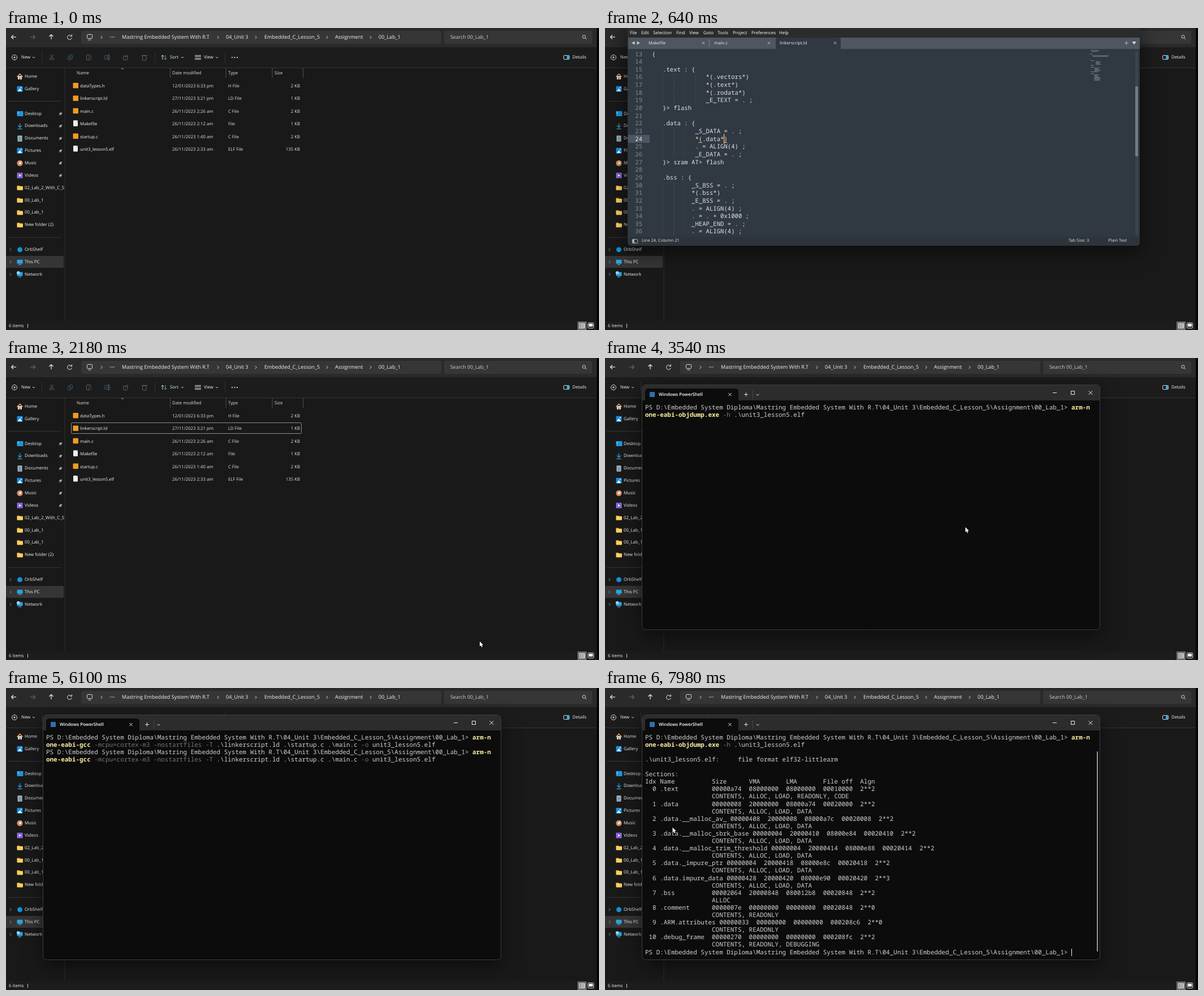
These frames come from a looping animation (1049 by 534 pixels, 8 s). An HTML page with a canvas:

```html
<!DOCTYPE html>
<html lang="en">
<head>
<meta charset="utf-8">
<title>Linker script demo</title>
<style>
  html, body { margin: 0; width: 100%; height: 100%; overflow: hidden; background: #191919; }
  canvas { display: block; }
</style>
</head>
<body>
<canvas id="stage" width="1049" height="534"></canvas>
<script>
const c = document.getElementById('stage').getContext('2d');
const LOOP = 8000;
const UI = '"Open Sans", "Noto Sans", sans-serif';
const MONO = '"Noto Sans Mono", "DejaVu Sans Mono", monospace';
const COURSE = 'Mastring Embedded System With R.T';

// Drawing helpers
function box(x, y, w, h, fill, r = 0, stroke) {
  c.beginPath();
  c.roundRect(x, y, w, h, r);
  if (fill) { c.fillStyle = fill; c.fill(); }
  if (stroke) { c.strokeStyle = stroke; c.lineWidth = 1; c.stroke(); }
}
function line(color, pts, width = 1) {
  c.beginPath();
  for (let i = 0; i < pts.length; i += 2) c.lineTo(pts[i], pts[i + 1]);
  c.strokeStyle = color;
  c.lineWidth = width;
  c.stroke();
}
function ring(x, y, r, color, from = 0, to = 7) {
  c.beginPath();
  c.arc(x, y, r, from, Math.min(to, from + Math.PI * 2));
  c.strokeStyle = color;
  c.lineWidth = 1;
  c.stroke();
}
function dot(x, y, r, color) {
  c.beginPath();
  c.arc(x, y, r, 0, 7);
  c.fillStyle = color;
  c.fill();
}
function text(s, x, y, size = 7.8, color = '#f2f2f2', align = 'left', weight = 400) {
  c.font = `${weight} ${size}px ${UI}`;
  c.fillStyle = color;
  c.textAlign = align;
  c.fillText(s, x, y);
}
function chevron(x, y, dir, color = '#ccc', s = 2) {
  if (dir === 'right') line(color, [x - s / 2, y - s, x + s / 2, y, x - s / 2, y + s]);
  else {
    const k = dir === 'down' ? 1 : -1;
    line(color, [x - s, y - k * s / 2, x, y + k * s / 2, x + s, y - k * s / 2]);
  }
}
function cross(x, y, s, color) {
  line(color, [x - s, y - s, x + s, y + s]);
  line(color, [x + s, y - s, x - s, y + s]);
}
function arrow(x, y, dx, dy, color) {
  const px = -dy, py = dx;
  line(color, [x - dx * 4, y - dy * 4, x + dx * 4, y + dy * 4], 1.2);
  line(color, [x + (px) * 3.5 + dx, y + py * 3.5 + dy, x + dx * 4.5, y + dy * 4.5,
               x - px * 3.5 + dx, y - py * 3.5 + dy], 1.2);
}
function shadowBox(x, y, w, h, fill, r) {
  c.save();
  c.shadowColor = 'rgba(0,0,0,.55)';
  c.shadowBlur = 34;
  c.shadowOffsetY = 10;
  box(x, y, w, h, fill, r);
  c.restore();
}
function mono(s, x, y, cell, colorAt, boldAt = () => false) {
  const size = cell / 0.6;
  c.textAlign = 'left';
  for (let i = 0; i < s.length; i++) {
    if (s[i] === ' ') continue;
    c.font = `${boldAt(i) ? 700 : 500} ${size}px ${MONO}`;
    c.fillStyle = colorAt(i);
    c.fillText(s[i], x + i * cell, y);
  }
}
const clamp = v => Math.max(0, Math.min(1, v));
const ease = v => v * v * (3 - 2 * v);

// File manager
const FILES = [
  ['dataTypes.h', '12/01/2023 6:33 pm', 'H File', '2 KB'],
  ['linkerscript.ld', '27/11/2023 3:21 pm', 'LD File', '1 KB'],
  ['main.c', '26/11/2023 2:26 am', 'C File', '2 KB'],
  ['Makefile', '26/11/2023 2:12 am', 'File', '1 KB'],
  ['startup.c', '26/11/2023 1:40 am', 'C File', '2 KB'],
  ['unit3_lesson5.elf', '26/11/2023 2:33 am', 'ELF File', '135 KB']
];
const SIDE = ['Home', 'Gallery', '', 'Desktop', 'Downloads', 'Documents', 'Pictures', 'Music',
  'Videos', '02_Lab_2_With_C_S', '00_Lab_1', '00_Lab_1', 'New folder (2)', '',
  'OrbShelf', 'This PC', 'Network'];
const CRUMBS = [[COURSE, 205, 375], ['04_Unit 3', 389, 442], ['Embedded_C_Lesson_5', 457, 568],
  ['Assignment', 582, 645], ['00_Lab_1', 659]];

function sideIcon(name, x, y) {
  const picture = () => {
    box(x - 5, y - 5, 10, 10, '#1a8ee0', 1);
    c.fillStyle = '#e9f5ff';
    c.beginPath(); c.moveTo(x - 4, y + 4); c.lineTo(x, y - 1); c.lineTo(x + 4, y + 4); c.fill();
    dot(x + 2.3, y - 2.3, 1, '#fff');
  };
  const screen = () => {
    box(x - 5, y - 4, 10, 7, '#26a5e4', 1);
    box(x - 2.5, y + 4, 5, 1, '#9ad');
  };
  const draw = {
    Home() {
      box(x - 3.5, y - 1, 7, 6, '#d9d9d9');
      box(x - 1, y + 1.5, 2, 3.5, '#8a6a50');
      line('#eda05a', [x - 5, y + 0.5, x, y - 4.5, x + 5, y + 0.5], 1.6);
    },
    Gallery: picture,
    Pictures: picture,
    Desktop() { box(x - 5, y - 4.5, 11, 9, '#1c95dc', 1); box(x - 4, y - 3, 2, 1, '#bfe6ff'); box(x - 4, y - 1, 2, 1, '#bfe6ff'); },
    Downloads() {
      line('#2aa3df', [x, y - 5, x, y + 2], 1.3);
      line('#2aa3df', [x - 3.5, y - 1, x, y + 2.5, x + 3.5, y - 1], 1.3);
      line('#2aa3df', [x - 4, y + 5, x + 4, y + 5], 1.3);
    },
    Documents() {
      box(x - 4, y - 5, 8, 10.5, '#a9bccb', 1);
      for (const d of [-2.5, 0, 2.5]) box(x - 2.5, y + d, 5, 1, '#4d6478');
    },
    Music() { dot(x, y, 5.2, '#d08a62'); dot(x, y, 2, '#f5e6dc'); line('#fff', [x + 1.5, y + 1, x + 1.5, y - 3, x + 3, y - 2]); },
    Videos() {
      box(x - 5, y - 5, 10, 10, '#7d5bd8', 1);
      c.fillStyle = '#fff';
      c.beginPath(); c.moveTo(x - 1.5, y - 2.3); c.lineTo(x + 2.5, y); c.lineTo(x - 1.5, y + 2.3); c.fill();
      for (const d of [-3.5, -0.5, 2.5]) { box(x - 4.3, y + d, 1, 1, '#ddd'); box(x + 3.5, y + d, 1, 1, '#ddd'); }
    },
    OrbShelf() { dot(x, y, 4.5, '#1490df'); },
    'This PC': screen,
    Network() { screen(); dot(x - 2.8, y - 2.8, 2.8, '#9fd2ef'); }
  }[name];
  if (draw) return draw();
  box(x - 5, y - 4, 5, 3, '#e8a92d', 1);
  box(x - 5, y - 2.8, 10.5, 7, '#fdd05f', 1);
}

function pin(x, y) {
  line('#999', [x - 3, y + 3, x - 0.5, y + 0.5]);
  line('#b0b0b0', [x - 2, y - 1, x + 1, y + 2], 2);
  line('#b0b0b0', [x - 0.5, y + 0.5, x + 2, y - 2], 2.4);
}

function toolIcons() {
  const dim = '#5b6268', blue = '#2f5a73';
  ring(15, 52, 4.5, '#e0e0e0');
  line('#e0e0e0', [13, 52, 17, 52]); line('#e0e0e0', [15, 50, 15, 54]);
  line(dim, [78, 47, 83, 54]); line(dim, [84, 47, 79, 54]);
  ring(78.5, 55, 1.7, blue); ring(83.5, 55, 1.7, blue);
  box(109.5, 49.5, 5, 7, null, 1, blue); box(112.5, 47.5, 5, 7, null, 1, blue);
  box(142.5, 47.5, 7, 9, null, 1, dim); box(146.5, 50.5, 4, 6, '#1c1c1c', 1, blue);
  box(174.5, 48.5, 9, 7, null, 1, blue);
  text('A', 177, 52, 6, dim); line(dim, [181.5, 46, 181.5, 58]);
  box(207.5, 49.5, 7, 7, null, 1, dim); line(blue, [210, 53, 212, 50, 216, 49.5]); line(blue, [214, 47, 216.5, 49.5, 214, 52]);
  line(dim, [240, 48.5, 250, 48.5]); box(241.5, 49, 6.5, 8, null, 1, dim);
  line('#d5d5d5', [277, 56, 277, 48]); line('#d5d5d5', [274.5, 50.5, 277, 48, 279.5, 50.5]);
  line('#4aa8dd', [282, 48, 282, 56]); line('#4aa8dd', [279.5, 53.5, 282, 56, 284.5, 53.5]);
  for (const y of [48.5, 50.5, 53.5, 55.5]) line('#cfcfcf', [334, y, 345, y]);
  for (const x of [400, 404.5, 409]) dot(x, 52, 1.1, '#eee');
  box(986.5, 48.5, 10, 7, null, 1.5, '#d5d5d5'); box(992, 48.5, 4.5, 7, '#3aa0dd', 1);
}

function explorer(mouse, focused) {
  box(0, 0, 1049, 534, '#191919');
  box(0, 0, 1045, 34, '#2a2a2a');
  box(0, 34, 1045, 36, '#1c1c1c');
  line('#343434', [0, 70.5, 1045, 70.5]);

  arrow(14, 16, -1, 0, '#eee');
  arrow(47, 16, 1, 0, '#666');
  arrow(80, 16, 0, -1, '#eee');
  ring(112.5, 16.5, 3.8, '#eee', 0.2, 5.6);
  line('#eee', [113.5, 14.5, 116.5, 14.5, 116.5, 11.5]);
  box(133, 5, 637, 23, '#363636', 3);
  box(775, 5, 262, 23, '#363636', 3);
  box(143.5, 11.5, 9, 7, null, 1, '#ddd');
  line('#ddd', [145.5, 21, 150.5, 21]);
  chevron(169, 16.5, 'right', '#ddd', 2.5);
  for (const x of [185, 188, 191]) dot(x, 16, 0.8, '#eee');
  for (const [s, x, next] of CRUMBS) {
    text(s, x, 16.5, 9.05);
    if (next) chevron(next, 16.5, 'right', '#ddd', 2.5);
  }
  text('Search 00_Lab_1', 786, 16.5, 8.8, '#cfcfcf');
  ring(1022.5, 15.5, 2.7, '#ddd');
  line('#ddd', [1024.5, 17.5, 1027, 20]);

  toolIcons();
  for (const x of [63.5, 263.5, 387.5]) line('#303030', [x, 42, x, 62]);
  text('New', 27, 52); chevron(49, 52, 'down');
  text('Sort', 290, 52); chevron(312, 52, 'down');
  text('View', 350, 52); chevron(373, 52, 'down');
  text('Details', 1002, 52);

  line('#2f2f2f', [104, 71, 104, 518]);
  box(0, 403, 102, 21, '#353535', 1);
  for (const y of [129.5, 370.5]) line('#353535', [3, y, 97, y]);
  c.save();
  c.beginPath(); c.rect(0, 70, 103, 460); c.clip();
  SIDE.forEach((name, i) => {
    const y = 86 + i * 21.85;
    if (!name) return;
    sideIcon(name, 24.5, y);
    text(name, 33, y);
    if (i > 2 && i < 9) pin(96.5, y);
    if (i > 13) chevron(8, y, 'right', '#8a8a8a', 2.5);
  });
  c.restore();

  [['Name', 125], ['Date modified', 294], ['Type', 393], ['Size', 475]]
    .forEach(([s, x]) => text(s, x, 79.5, 7.8, '#dedede'));
  for (const x of [290.5, 389, 471, 525.5]) line('#505050', [x, 71, x, 88]);
  chevron(206, 72, 'up', '#aaa');
  FILES.forEach(([name, date, type, size], i) => {
    const y = 102.5 + i * 22.4, top = Math.round(y - 11);
    const hot = mouse && mouse[0] > 115 && mouse[0] < 523 && Math.abs(mouse[1] - y) < 10.5;
    if (hot) box(115, top, 408, 20, '#303030', 2);
    if (i === 1 && focused) box(115.5, top + 0.5, 407, 19, null, 1, '#8c8c8c');
    if (/\.(h|ld|c)$/.test(name)) box(118.5, y - 5.5, 9.5, 9.5, '#f29a22', 1);
    else {
      box(119, y - 6.5, 8, 10.5, '#f0f0f0', 1);
      box(124.5, y - 6.5, 2.5, 2.5, '#bdbdbd');
    }
    text(name, 131, y + 0.5, 7.7);
    text(date, 294, y + 0.5, 7.8, '#e0e0e0');
    text(type, 393, y + 0.5, 7.7, '#e0e0e0');
    text(size, 520, y + 0.5, 7.8, '#e0e0e0', 'right');
  });

  box(0, 518, 1045, 16, '#1c1c1c');
  text('6 items', 5, 526.5);
  line('#ccc', [38.5, 523, 38.5, 530]);
  box(1011, 519, 16, 15, '#6e6e6e');
  box(1014.5, 522.5, 9, 8, null, 0, '#eee');
  for (const y of [524.5, 526.5, 528.5]) line('#eee', [1016, y, 1023, y]);
  box(1029.5, 521.5, 10, 9, '#111', 1, '#eee');
  box(1031, 523, 7, 5, '#fff');
  box(1045, 0, 4, 534, '#050505');
}

// Code editor: [column, text] from line 13 on
const CODE = [[0, '{'], [0, ''], [3, '.text : {'], [15, '*(.vectors*)'], [15, '*(.text*)'],
  [15, '*(.rodata*)'], [15, '_E_TEXT = . ;'], [3, '}> flash'], [0, ''], [3, '.data : {'],
  [12, '_S_DATA = . ;'], [12, '*(.data*)'], [12, '. = ALIGN(4) ;'], [12, '_E_DATA = . ;'],
  [3, '}> sram AT> flash'], [0, ''], [3, '.bss : {'], [11, '_S_BSS = . ;'], [11, '*(.bss*)'],
  [11, '_E_BSS = . ;'], [11, '. = ALIGN(4) ;'], [11, '. = . + 0x1000 ;'],
  [11, '_HEAP_END = . ;'], [11, '. = ALIGN(4) ;']];
const MENU = [['File', 44], ['Edit', 64], ['Selection', 85], ['Find', 126], ['View', 149], ['Goto', 174],
  ['Tools', 199], ['Project', 226], ['Preferences', 259], ['Help', 308]];

function editor(t) {
  const cell = 6.37, left = 83, edited = t >= 1240;
  shadowBox(40, -14, 906, 399, '#303841', 6);
  box(41, 0, 905, 17, '#2b2b2b');
  MENU.forEach(([s, x]) => text(s, x, 8.5, 7.8, '#fff'));
  box(41, 17, 905, 20, '#4e565f');
  box(302, 17, 115, 20, '#303841', [3, 3, 0, 0]);
  line('#78808a', [184.5, 20, 184.5, 34]);
  c.fillStyle = '#c5cad0';
  for (const k of [-1, 1]) {
    c.beginPath();
    c.moveTo(54.5 + k * 7.5, 26.5); c.lineTo(54.5 + k * 2, 23.5); c.lineTo(54.5 + k * 2, 29.5);
    c.fill();
  }
  [['Makefile', 77, 174], ['main.c', 193, 290], ['linkerscript.ld', 309, 407]].forEach(([s, x, end], i) => {
    text(s, x, 26.5, 7.7, '#e8ebee');
    if (i === 2 && t >= 1260) dot(end, 26.5, 2.5, '#c5cad0');
    else cross(end, 26.5, 2.2, '#b9bfc6');
  });
  line('#aab0b7', [919, 26.5, 926, 26.5]); line('#aab0b7', [922.5, 23, 922.5, 30]);
  c.fillStyle = '#d5d9dd';
  c.beginPath(); c.moveTo(932.5, 24); c.lineTo(939.5, 24); c.lineTo(936, 29.5); c.fill();

  c.save();
  c.beginPath(); c.rect(40, 37, 906, 332); c.clip();
  box(41, 189, 38, 14, '#4b5763');
  if (edited) box(40, 189, 2, 14, '#f9ae58');
  CODE.forEach(([col, s], i) => {
    const y = 46.5 + i * 13.65, num = String(13 + i), here = i === 11;
    if (here && edited) s = s.replace('*)', ')');
    const shade = here ? '#e6e9ed' : '#848b95';
    mono(num, 66 - 2 * cell, y, cell, () => shade);
    for (let g = 3; g < col; g += 3) line('#3b444e', [left + g * cell + 0.5, y - 7, left + g * cell + 0.5, y + 7]);
    mono(s, left + col * cell, y, cell, () => '#dfe4ec');
    if (s) box(857 + col * 0.75, 54 + i * 1.65, s.length * 0.7, 0.9, '#7d858f');
  });
  [[859, 39, 15], [860, 41, 12], [857, 45.5, 5], [861, 48.5, 30], [863, 49.7, 26]]
    .forEach(([x, y, w]) => box(x, y, w, 0.9, '#7d858f'));
  const end = left + (edited ? 19 : 20) * cell;
  box(165.5, 202, 6.5, 1, '#f9ae58');
  box(end, 202, 6, 1, '#f9ae58');
  box(end - 0.5, 187.5, 1.5, 17, '#f9ae58');
  box(938, 41, 5, 325, '#3b434c', 2);
  box(938, 103, 5, 124, '#747b83', 2);
  c.restore();

  box(41, 369, 905, 16, '#2d343c', [0, 0, 6, 6]);
  box(48.5, 373.5, 9, 7, null, 1, '#a8aeb5');
  box(49, 374, 3, 6, '#a8aeb5');
  text(`Line 24, Column ${edited ? 20 : 21}`, 65, 376.5, 7.5, '#dde1e5');
  text('Tab Size: 3', 820, 376.5, 7.5, '#dde1e5');
  text('Plain Text', 890, 376.5, 7.5, '#dde1e5');
}

// Terminal
const COLS = 120, ROWS = 30, CELL = 6.557, STEP = 13.1;
const PROMPT = `PS D:\\Embedded System Diploma\\${COURSE}\\04_Unit 3\\Embedded_C_Lesson_5\\Assignment\\00_Lab_1> `;
const GCC = 'arm-none-eabi-gcc -mcpu=cortex-m3 -nostartfiles -T .\\linkerscript.ld .\\startup.c .\\main.c -o unit3_lesson5.elf';
const DUMP = 'arm-none-eabi-objdump.exe -h .\\unit3_lesson5.elf';
const DATA = 'CONTENTS, ALLOC, LOAD, DATA';
const SECTIONS = [
  ['.text', '00000a74  08000000  08000000  00010000  2**2', 'CONTENTS, ALLOC, LOAD, READONLY, CODE'],
  ['.data', '00000008  20000000  08000a74  00020000  2**2', DATA],
  ['.data.__malloc_av_', '00000408  20000008  08000a7c  00020008  2**2', DATA],
  ['.data.__malloc_sbrk_base', '00000004  20000410  08000e84  00020410  2**2', DATA],
  ['.data.__malloc_trim_threshold', '00000004  20000414  08000e88  00020414  2**2', DATA],
  ['.data._impure_ptr', '00000004  20000418  08000e8c  00020418  2**2', DATA],
  ['.data.impure_data', '00000428  20000420  08000e90  00020420  2**3', DATA],
  ['.bss', '00002064  20000848  080012b8  00020848  2**2', 'ALLOC'],
  ['.comment', '0000007e  00000000  00000000  00020848  2**0', 'CONTENTS, READONLY'],
  ['.ARM.attributes', '00000033  00000000  00000000  000208c6  2**0', 'CONTENTS, READONLY'],
  ['.debug_frame', '00000270  00000000  00000000  000208fc  2**2', 'CONTENTS, READONLY, DEBUGGING']
];
const OUTPUT = ['', '.\\unit3_lesson5.elf:     file format elf32-littlearm', '', 'Sections:',
  'Idx Name          Size      VMA       LMA       File off  Algn',
  ...SECTIONS.flatMap(([name, nums, flags], i) =>
    [`${String(i).padStart(3)} ${name.padEnd(13)} ${nums}`, ' '.repeat(18) + flags])].join('\n');
const HALFWAY = OUTPUT.indexOf('00000428  2') + 11;

// Rows of a prompt with a command; key marks each character's colour
function entry(cmd = '') {
  const s = PROMPT + cmd;
  const key = ' '.repeat(PROMPT.length) +
    cmd.replace(/\S+/g, (w, i) => (i === 0 ? 'y' : w[0] === '-' ? 'g' : ' ').repeat(w.length));
  const rows = [];
  for (let i = 0; i < s.length; i += COLS) rows.push({ s: s.slice(i, i + COLS), key: key.slice(i, i + COLS) });
  return rows;
}
const plain = s => s.split('\n').map(row => ({ s: row, key: '' }));

function session(t) {
  if (t < 2940) return entry();
  if (t < 3060) return entry('ar');
  if (t < 3220) return entry('arm');
  if (t < 3820) return entry(DUMP);
  if (t < 4280) return entry(GCC);
  const done = entry(GCC);
  if (t < 5080) return [...done, ...plain('')];
  if (t < 5760) return [...done, ...entry()];
  if (t < 6140) return [...done, ...entry(GCC)];
  if (t < 6380) return [...done, ...entry()];
  done.push(...entry(DUMP));
  if (t < 6740) return done;
  const shown = Math.round(HALFWAY * (t - 6740) / 120);
  return [...done, ...plain(OUTPUT.slice(0, shown)), ...(t < 7000 ? [] : entry())];
}
const CARET_OFF = [[3540, 3920], [4260, 4280], [4560, 4800], [5020, 5080], [5300, 5600], [6100, 6140], [7300, 7600]];
const TINT = { y: '#f9f1a5', g: '#767676' };

function terminal(t) {
  shadowBox(66, 48, 809, 432, '#0c0c0c', 6);
  box(66, 48, 809, 27, '#2c2c2c', [6, 6, 0, 0]);
  box(65.5, 47.5, 810, 433, null, 6, '#3d3d3d');
  box(71, 54, 165, 22, '#0c0c0c', [5, 5, 0, 0]);
  box(79, 60, 9, 9, '#2f6fb5', 1);
  text('Windows PowerShell', 95, 65, 7.8, '#fff', 'left', 600);
  cross(221, 64.5, 2.7, '#ddd');
  line('#ddd', [246, 64.5, 253, 64.5]); line('#ddd', [249.5, 61, 249.5, 68]);
  line('#484848', [261.5, 57, 261.5, 72]);
  chevron(270, 65, 'down', '#ddd', 2.5);
  line('#eee', [792, 61.5, 799, 61.5]);
  box(824.5, 58.5, 6, 6, null, 0, '#eee');
  cross(859, 61.5, 3.3, '#eee');

  const rows = session(t), first = Math.max(0, rows.length - ROWS);
  rows.slice(first).forEach(({ s, key }, i) =>
    mono(s, 71, 87.5 + i * STEP, CELL, k => TINT[key[k]] || '#d2d2d2', k => key[k] === 'y'));
  if (!CARET_OFF.some(([a, b]) => t >= a && t < b)) {
    const x = 71 + rows[rows.length - 1].s.length * CELL;
    box(Math.round(x), Math.round(81 + (rows.length - 1 - first) * STEP), 1, 13, '#f2f2f2');
  }
  if (first) box(870, 112, 2, 354, '#9a9a9a', 1);
}

// Pointer paths: [time, x, y], hidden outside each span
const PATHS = [
  [[20, 980, 524], [320, 168, 123], [620, 168, 123]],
  [[680, 214, 198], [940, 560, 330], [1240, 560, 330]],
  [[1760, 560, 330], [1900, 868, 6], [1980, 868, 6], [2180, 838, 501], [2280, 800, 536]],
  [[2440, 700, 522], [2680, 637.5, 299], [4320, 637.5, 299]],
  [[7300, 637, 299], [7480, 330, 214], [7600, 205, 174], [7780, 150, 214], [7980, 119.5, 246.5], [LOOP, 119.5, 246.5]]
];
function pointer(t) {
  const path = PATHS.find(p => t >= p[0][0] && t < p[p.length - 1][0]);
  if (!path) return null;
  const i = path.findIndex(p => p[0] > t);
  const [a, x, y] = path[i - 1], [b, u, v] = path[i];
  const k = ease((t - a) / (b - a));
  return [x + (u - x) * k, y + (v - y) * k];
}
function drawPointer([x, y], beam) {
  if (beam) {
    line('#fff', [x, y - 6, x, y + 6]);
    line('#fff', [x - 2, y - 6, x + 2, y - 6]);
    line('#fff', [x - 2, y + 6, x + 2, y + 6]);
    return;
  }
  c.beginPath();
  [[0, 0], [0, 9], [2, 7.2], [3.5, 10.5], [5, 9.8], [3.6, 6.7], [6.4, 6.5]].forEach(([dx, dy]) => c.lineTo(x + dx, y + dy));
  c.closePath();
  c.strokeStyle = '#000';
  c.lineWidth = 1.2;
  c.stroke();
  c.fillStyle = '#fff';
  c.fill();
}

// Draw a window scaled about (cx, cy), moved and faded by k = 0..1
function settle(k, cx, cy, drop, draw) {
  c.save();
  c.globalAlpha = k;
  const s = 0.88 + 0.12 * k;
  c.translate(cx, cy + drop * (1 - k));
  c.scale(s, s);
  c.translate(-cx, -cy);
  draw();
  c.restore();
}

function render(time) {
  const t = Math.floor((time % LOOP + 0.01) / 20) * 20;
  const mouse = pointer(t);
  const editing = t >= 620 && t < 2020;
  c.textBaseline = 'middle';
  c.textRendering = 'geometricPrecision';
  explorer(editing || t >= 2440 ? null : mouse, t >= 620);
  if (editing) {
    const k = t < 640 ? 0.5 : 1 - ease(clamp((t - 1920) / 100));
    settle(k, 493, 190, 120, () => editor(t));
  }
  if (t >= 2440) settle(ease(clamp((t - 2420) / 80)), 470, 264, 30, () => terminal(t));
  if (mouse) drawPointer(mouse, editing && t < 1920 && mouse[1] > 37 && mouse[1] < 369);
}

const start = performance.now();
function tick() {
  render(performance.now() - start);
  requestAnimationFrame(tick);
}
tick();
</script>
</body>
</html>
```
